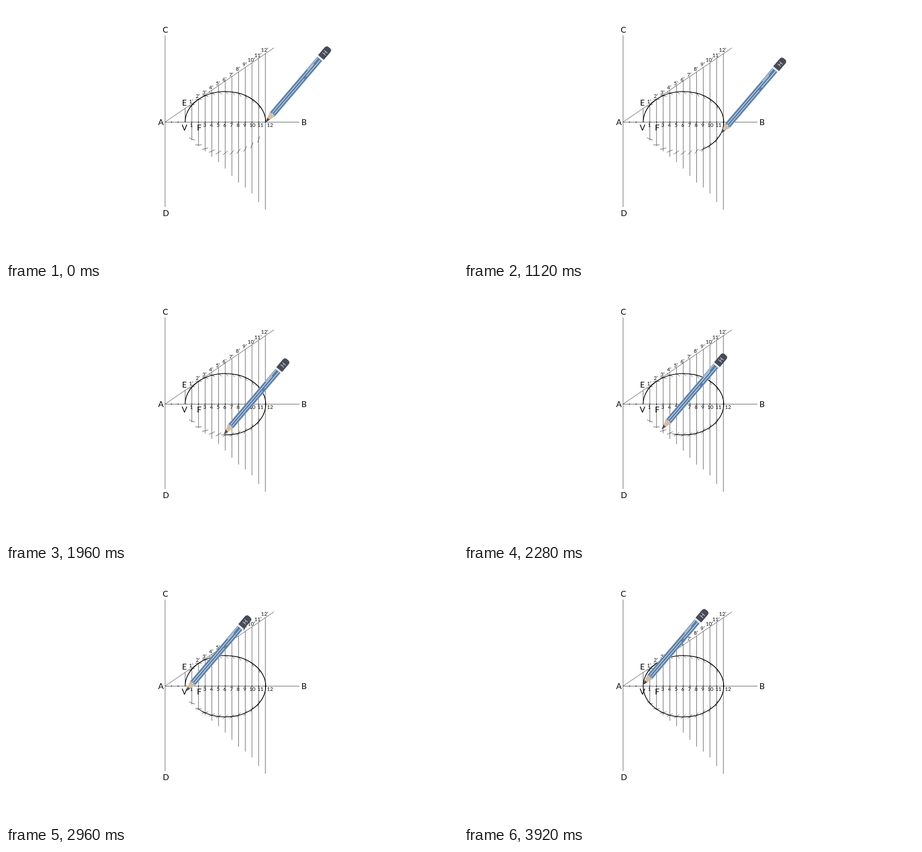
Write an HTML page that moves like this. It is 998x561 px and loops after 3.96 s.

```html
<!DOCTYPE html>
<html lang="en">
<head>
<meta charset="utf-8">
<title>Drawing an ellipse</title>
<style>
  html, body { margin: 0; width: 100%; height: 100%; overflow: hidden; background: #fff; }
  svg { display: block; }
  text { font-family: Lato, sans-serif; text-anchor: middle; }
  #labels { font-size: 18px; }
  #numbers { font-size: 11.3px; }
  #thin { fill: none; stroke: #333; stroke-width: .9; }
  .curve { fill: none; stroke: #000; stroke-width: 1.7; }
</style>
</head>
<body>
<svg width="998" height="561" viewBox="0 0 998 561">
  <defs>
    <linearGradient id="edge" gradientUnits="userSpaceOnUse" x1="0" y1="0" x2="18" y2="0">
      <stop offset="0" stop-color="#000"/>
      <stop offset="1" stop-color="#fff"/>
    </linearGradient>
    <mask id="wipe" maskUnits="userSpaceOnUse" x="380" y="240" width="210" height="100">
      <rect x="380" y="240" width="210" height="100" fill="url(#edge)"/>
    </mask>
  </defs>
  <path id="thin"/>
  <path id="dots"/>
  <g id="labels"></g>
  <g id="numbers"></g>
  <path class="curve" d="M395.5 256.5A89 67.5 0 0 1 573.5 256.5"/>
  <path class="curve" d="M573.5 256.5A89 68 0 0 1 395.5 256.5" mask="url(#wipe)"/>
  <g id="pencil">
    <path d="M0 0L23 -7.3V7.3Z" fill="#d6bda3"/>
    <path d="M0 0L11 -3.6Q9.5 0 11 3.6Z" fill="#484b57"/>
    <path d="M22 -7Q26 -5 23 -2.5Q27 0 23 2.5Q26 5 22 7H185V-7Z" fill="#5b7fa9" stroke="#a9bccf" stroke-width="1"/>
    <path d="M26 -2.5H167M26 2.5H128M136 2.5H184M148 -4.8H184" stroke="#e8eef4" stroke-width="1.2"/>
    <path d="M184.5 -7.8H188.5V7.8H184.5Z" fill="#e9ebee"/>
    <path d="M188.5 -8.3H210Q217 -8.3 217 -2V2Q217 8.3 210 8.3H188.5Z" fill="#484b57"/>
    <text x="202" y="4.7" font-size="13" fill="#d5d8de">H</text>
  </g>
</svg>
<script>
const $ = id => document.getElementById(id);
const LOOP = 3960, CX = 484.5, AXIS = 256.5, RX = 89, RY = 68, FOCUS = 425.3;

function label(group, text, x, y) {
  const el = document.createElementNS('http://www.w3.org/2000/svg', 'text');
  el.setAttribute('x', x);
  el.setAttribute('y', y);
  el.textContent = text;
  $(group).append(el);
}

// Compass arc about the focus, reaching `back` and `ahead` px around the ellipse point at x
function compassArc(x, side, back, ahead) {
  const dx = x - FOCUS;
  const dy = side * RY * Math.sqrt(1 - ((x - CX) / RX) ** 2);
  const r = Math.hypot(dx, dy), angle = Math.atan2(dy, dx);
  const at = s => `${FOCUS + r * Math.cos(angle + s / r)} ${AXIS + r * Math.sin(angle + s / r)}`;
  return `M${at(-back)}A${r} ${r} 0 0 1 ${at(ahead)}`;
}

const bottoms = [257, 297, 309, 321, 333, 345, 359, 375, 390, 401, 414, 433, 450];
const primeY = [0, 211, 199, 191, 180, 171, 162, 152, 139, 129, 119, 108.5, 96.5];
let thin = `M351.2 65V444M351 ${AXIS}H648M351 ${AXIS}L591.5 92.5`;
let dots = 'M364.5 255.5h2v2h-2zM379 255.5h2v2h-2z';

bottoms.forEach((bottom, i) => {
  const x = 395.5 + 14.76 * i;
  thin += `M${x} ${AXIS - (x - 351) * .682}V${bottom}`;
  if (!i) return;
  dots += `M${x - 1} 255.5h2v2h-2z`;
  label('numbers', i + '’', x - 1.5, primeY[i] + 4);
  if (i !== 2) label('numbers', i, x + (i < 10 ? -1 : i < 11 ? 1 : i < 12 ? 4 : 10.3), 267.3);
  if (i < 12) {
    thin += compassArc(x, 1, 7, 7);
    thin += i < 5 ? compassArc(x, -1, 7, 7) : compassArc(x, -1, 1, 9);
  }
});
$('thin').setAttribute('d', thin);
$('dots').setAttribute('d', dots);

[['A', 342, 263], ['B', 658, 263], ['C', 352, 58.5], ['D', 353, 464],
 ['E', 394, 220], ['V', 394, 275], ['F', 426.5, 274.5]].forEach(l => label('labels', ...l));

function draw(now) {
  const t = now % LOOP;
  const u = Math.min(1, Math.max(0, (t - 100) / 3680));
  const eased = u - Math.sin(2 * Math.PI * u) / (2 * Math.PI);
  const angle = Math.PI * eased;
  const x = CX - .5 + RX * Math.cos(angle);
  const y = 257 + RY * Math.sin(angle) - 3 * eased;
  $('pencil').setAttribute('transform', `translate(${x} ${y}) rotate(-49.5)`);
  $('edge').setAttribute('gradientTransform', `translate(${575.5 - .0535 * t} 0)`);
  requestAnimationFrame(() => draw(performance.now()));
}
draw(0);
</script>
</body>
</html>
```
